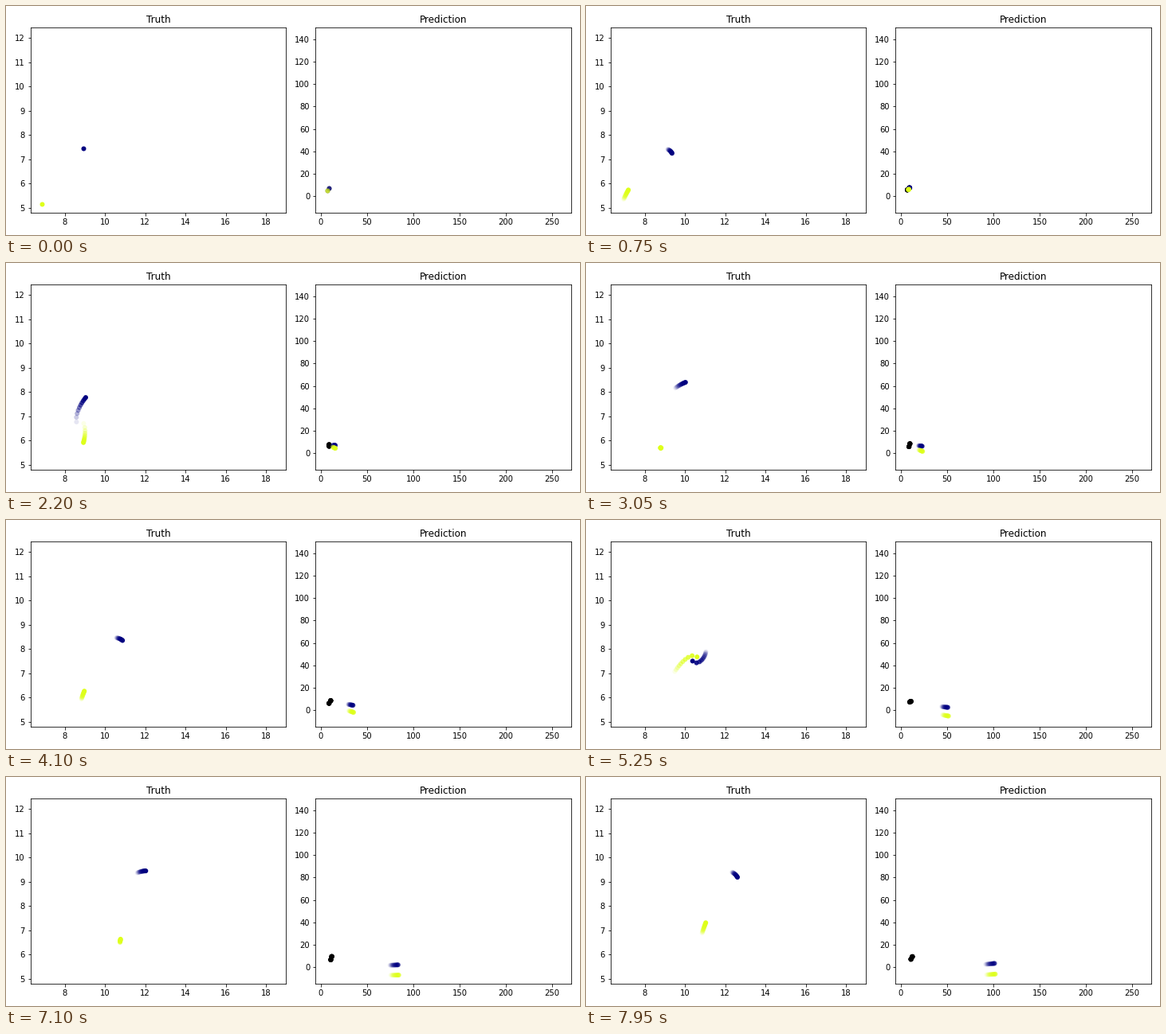
These frames come from a looping animation (720x288 px, 8 s). A matplotlib script:

```python
import numpy as np
import matplotlib.pyplot as plt
from matplotlib.animation import FuncAnimation

W, H, DPI = 720, 288, 72
FRAMES, STEP = 160, 50
TRAIL = 11
BLACK, NAVY, LIME = (0, 0, 0), (0, 0, 0.5), (0.87, 1, 0.1)

plt.rcParams["font.family"] = "DejaVu Sans"


def orbit(t):
    """Two equal masses on a drifting, slowly turning eccentric orbit."""
    a, e, period, peri = 0.839, 0.84, 70.5, 104.75
    turn, start = np.radians(9.3), np.radians(49)
    # phase counted from the widest separation
    phase = 2 * np.pi * ((t - peri) / period + 1.5)
    lap = np.floor(phase / (2 * np.pi) + 0.5)
    m = phase - 2 * np.pi * lap
    lo, hi = np.full_like(m, -np.pi), np.full_like(m, np.pi)
    for _ in range(50):
        mid = (lo + hi) / 2
        low = mid + e * np.sin(mid) < m
        lo, hi = np.where(low, mid, lo), np.where(low, hi, mid)
    x = a * (e + np.cos(mid))
    y = a * np.sqrt(1 - e * e) * np.sin(mid)
    swept = np.arctan2(y, x) + 2 * np.pi * lap
    angle = start - swept * (1 - turn / (2 * np.pi))
    arm = np.hypot(x, y)[:, None] * np.c_[np.cos(angle), np.sin(angle)]
    centre = np.c_[7.9 + 0.02465 * t, 6.31 + 0.0122 * t]
    return centre + arm, centre - arm


def forecast(t):
    """The pair meets once, then is flung right while its centre swings down."""
    meet = 29
    s = np.maximum(t - meet, 0)
    settle = np.exp(-t / 20)
    centre = np.c_[7.9 + 0.09 * t + 0.2115 * s + 0.00308 * s**2,
                   1.9 + 4.65 * np.cos(np.pi * (t - 20) / 112) + 0.45 * settle]
    arm = np.c_[1.43 * np.exp(-t / 30) - 0.4,
                0.25 + 0.031 * np.maximum(meet - t, 0) + 5.2 * (1 - np.exp(-s / 64))]
    return centre + arm, centre - arm


times = np.arange(FRAMES, dtype=float)
true_a, true_b = orbit(times)
pred_a, pred_b = forecast(times)

fig = plt.figure(figsize=(W / DPI, H / DPI), dpi=DPI, facecolor="white")


def panel(left, title, xlim, ylim, xticks, yticks):
    ax = fig.add_axes([left / W, 28 / H, 320.4 / W, 233.2 / H])
    ax.set(xlim=xlim, ylim=ylim, xticks=xticks, yticks=yticks)
    ax.set_title(title)
    return ax


truth = panel(31, "Truth", (6.307, 19.006), (4.797, 12.443),
              range(8, 19, 2), range(5, 13))
guess = panel(388.2, "Prediction", (-5.8, 270.4), (-14.89, 150.81),
              range(0, 251, 50), range(0, 141, 20))


def dots(ax, path, color, strength, fades=True):
    art = ax.scatter([], [], s=36, linewidths=0)
    return art, path, color, strength, fades


layers = [
    dots(truth, true_a, NAVY, 1),
    dots(truth, true_b, LIME, 1),
    dots(guess, true_a, BLACK, 0.5, fades=False),
    dots(guess, true_b, BLACK, 0.5, fades=False),
    dots(guess, pred_a, NAVY, 0.7),
    dots(guess, pred_b, LIME, 0.7),
]


def draw(n):
    first = max(0, n - TRAIL + 1)
    ramp = np.linspace(0, 1, TRAIL)[-(n - first + 1):]
    for art, path, color, strength, fades in layers:
        art.set_offsets(path[first:n + 1])
        art.set_facecolors([(*color, strength * (f if fades else 1))
                            for f in ramp])
    return [layer[0] for layer in layers]


anim = FuncAnimation(fig, draw, frames=FRAMES, interval=STEP,
                     init_func=lambda: draw(0), repeat=True, repeat_delay=0)
plt.show()
```
